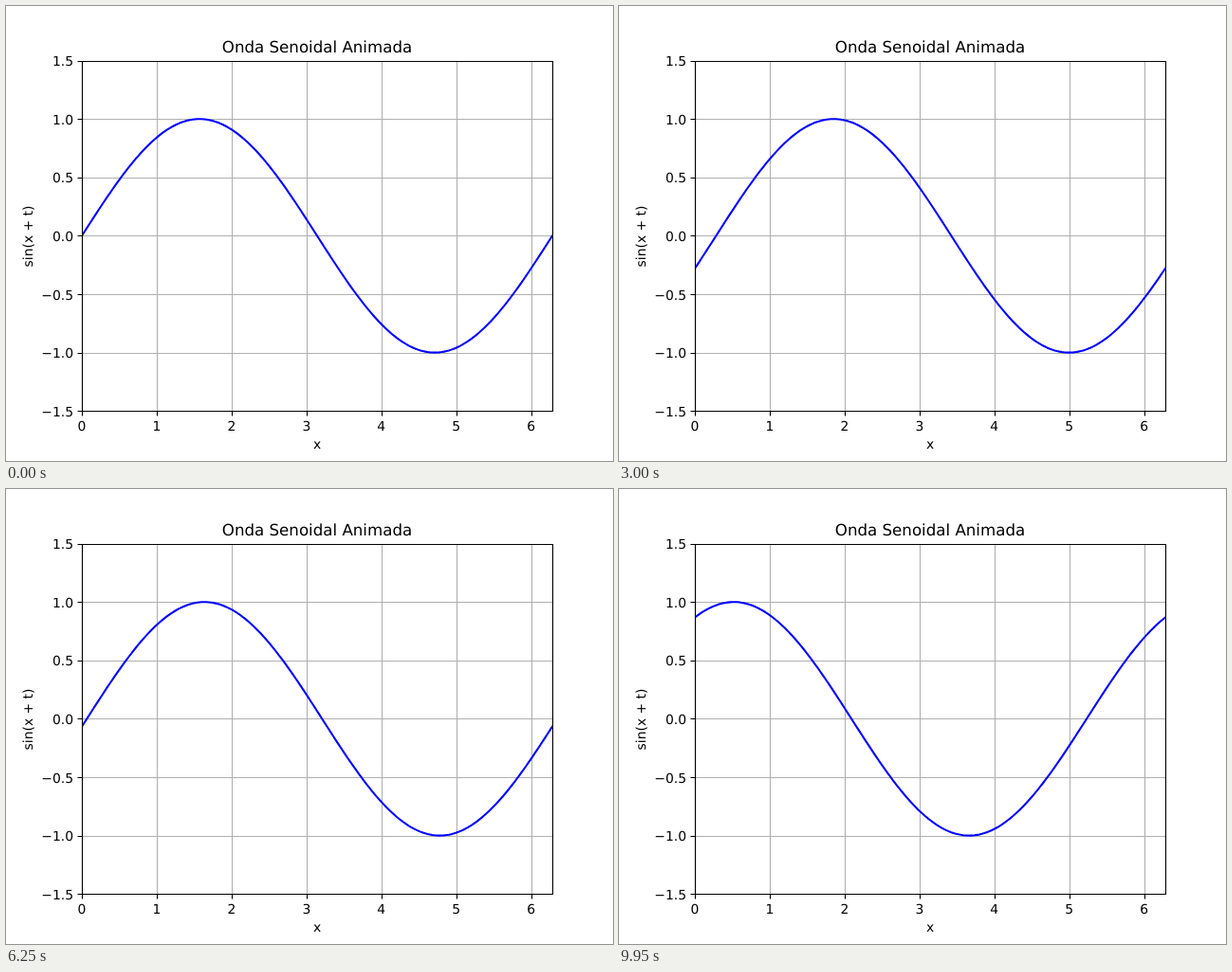
An HTML page that plays this animation: 640 by 480 pixels, repeating every 10 s.

```html
<!DOCTYPE html>
<html lang="pt">
<head>
<meta charset="utf-8">
<title>Onda Senoidal Animada</title>
<style>
  html, body { margin: 0; height: 100%; overflow: hidden; background: #fff; }
  svg { display: block; }
  text {
    font: 13.889px "DejaVu Sans", sans-serif;
    text-anchor: middle;
    text-rendering: geometricPrecision;
  }
  path { fill: none; stroke: #000; stroke-width: 1.111; }
  #grid { stroke: #b0b0b0; }
  #wave { stroke: #00f; stroke-width: 2.083; stroke-linejoin: round; stroke-linecap: square; }
  #frame { stroke-linecap: square; }
</style>
</head>
<body>
<svg width="640" height="480" viewBox="0 0 640 480">
  <clipPath id="plot"><rect x="80" y="58" width="496" height="369"/></clipPath>
  <path id="grid"/>
  <path id="wave" clip-path="url(#plot)"/>
  <path id="ticks"/>
  <path id="frame" d="M80.5 58.5H576.5V427.5H80.5Z"/>
  <g id="labels"></g>
  <text x="328" y="49" style="font-size:16.667px">Onda Senoidal Animada</text>
  <text x="328" y="467">x</text>
  <text transform="translate(28 243) rotate(-90)">sin(x + t)</text>
</svg>
<script>
const el = id => document.getElementById(id);
const toX = x => 80 + 496 * x / (2 * Math.PI);
const toY = y => 242.4 - 123.2 * y;
const snap = v => Math.floor(v + 0.5) + 0.5;

let grid = '', ticks = '', labels = '';
for (let n = 0; n <= 6; n++) {
  const x = snap(toX(n));
  grid += `M${x} 58V427`;
  ticks += `M${x} 427.5v5`;
  labels += `<text x="${toX(n)}" y="448">${n}</text>`;
}
for (let v = -1.5; v <= 1.5; v += 0.5) {
  const y = snap(toY(v));
  grid += `M80 ${y}H576`;
  ticks += `M80.5 ${y}h-5`;
  const label = v.toFixed(1).replace('-', '\u2212');
  labels += `<text x="71" y="${Math.round(toY(v) + 5.5)}" style="text-anchor:end">${label}</text>`;
}
el('grid').setAttribute('d', grid);
el('ticks').setAttribute('d', ticks);
el('labels').innerHTML = labels;

const STEP = 50, LOOP = 10000, POINTS = 200;

function draw(now) {
  const t = 0.1 * Math.floor((now % LOOP) / STEP);
  const points = Array.from({ length: POINTS + 1 }, (_, i) => {
    const x = 2 * Math.PI * i / POINTS;
    return `${toX(x).toFixed(2)} ${toY(Math.sin(x + t)).toFixed(2)}`;
  });
  el('wave').setAttribute('d', 'M' + points.join('L'));
}

const start = performance.now();
function tick() {
  draw(performance.now() - start);
  requestAnimationFrame(tick);
}
tick();
</script>
</body>
</html>
```
